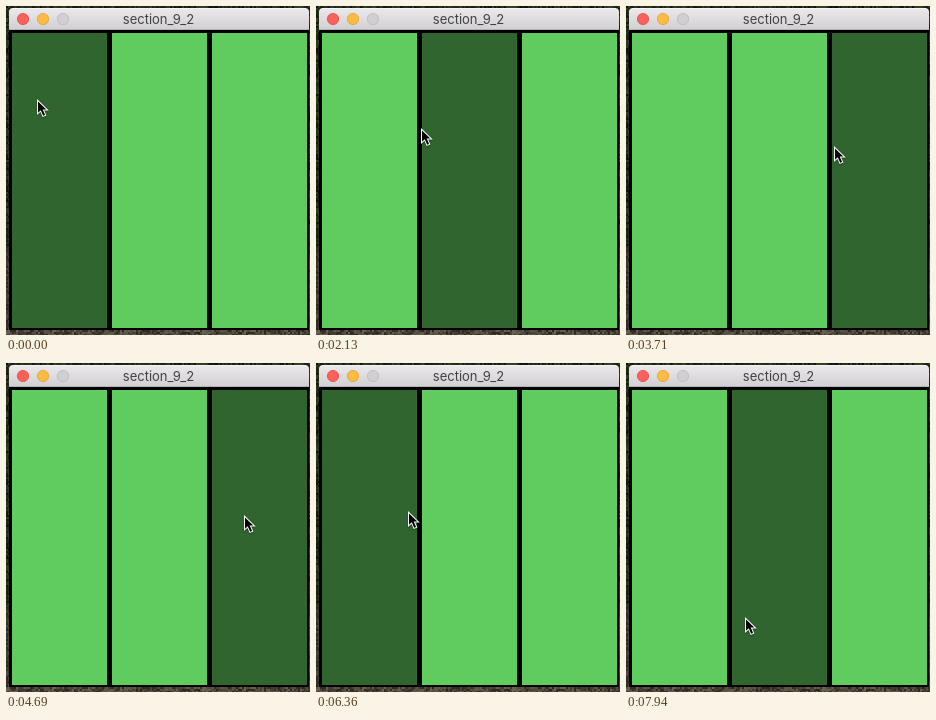
Write an HTML page with a canvas that moves like this. It is 304 px wide and 329 px high and loops after 8000 ms.

```html
<!DOCTYPE html>
<html lang="en">
<head>
<meta charset="utf-8">
<title>section_9_2</title>
<style>
  html, body { margin: 0; width: 100%; height: 100%; overflow: hidden; background: #000; }
  canvas { position: absolute; left: 0; top: 0; display: block; }
  #title {
    position: absolute; left: 3px; top: 2px; width: 299px; height: 22px;
    font: 13px/23px Inter, Roboto, sans-serif; color: #424142; text-align: center;
  }
</style>
</head>
<body>
<canvas id="stage" width="304" height="329"></canvas>
<div id="title">section_9_2</div>
<script>
const ctx = document.getElementById('stage').getContext('2d');
const LOOP = 8000;
const LIGHT = '#60cb5f', DARK = '#306530';

// Pointer path as [step, x, y]; each run advances in small discrete steps.
const runs = [
  { start: 900, period: 87.9, offset: -2, keys: [
    [0, 32, 94], [7, 65, 113], [10, 79, 116], [20, 136, 129],
    [23, 157, 130], [30, 191, 136], [38, 241, 153]] },
  { start: 4690, period: 87.99, offset: 0, keys: [
    [0, 241, 153], [1, 239, 153], [10, 172, 149], [14, 142, 148],
    [20, 93, 149], [30, 44, 205], [38, 120, 255]] }
];

let seed = 7;
function random() {
  seed = (seed * 16807) % 2147483647;
  return seed / 2147483647;
}

function slope(a, b, axis) {
  return (b[axis] - a[axis]) / (b[0] - a[0]);
}

function tangent(keys, i, axis) {
  if (i === 0) return slope(keys[0], keys[1], axis);
  if (i === keys.length - 1) return slope(keys[i - 1], keys[i], axis);
  const a = slope(keys[i - 1], keys[i], axis);
  const b = slope(keys[i], keys[i + 1], axis);
  return a * b <= 0 ? 0 : 2 * a * b / (a + b);
}

// Monotone cubic through the keys, so the pointer never overshoots a turn.
function along(keys, n, axis) {
  let i = 0;
  while (i < keys.length - 2 && n >= keys[i + 1][0]) i++;
  const a = keys[i], b = keys[i + 1], h = b[0] - a[0];
  const u = (n - a[0]) / h, v = 1 - u;
  return v * v * (1 + 2 * u) * a[axis] + u * u * (3 - 2 * u) * b[axis]
    + h * u * v * (v * tangent(keys, i, axis) - u * tangent(keys, i + 1, axis));
}

function pointerAt(t) {
  const run = runs[t < runs[1].start ? 0 : 1];
  const tick = Math.floor((t - run.start) / 10) * 10 + 10;
  const n = Math.max(0, Math.min(38, Math.ceil((tick - run.offset) / run.period)));
  return [1, 2].map(axis => Math.round(along(run.keys, n, axis)));
}

function drawDesktop() {
  ctx.fillStyle = '#14170e';
  ctx.fillRect(0, 0, 304, 329);
  for (let y = 0; y < 329; y += 2) {
    const edge = y < 2 || y > 323;
    for (let x = 0; x < 304; x += 2) {
      if (!edge && x > 2 && x < 302) continue;
      const stone = y > 240;
      const light = (stone ? 14 : 5) + random() * (y > 323 ? 24 : 15);
      ctx.fillStyle = `hsl(${stone ? 35 : 85} ${stone ? 14 : 32}% ${light}%)`;
      ctx.fillRect(x, y, 2, 2);
    }
  }
}

function drawTitleBar() {
  const shade = ctx.createLinearGradient(0, 2, 0, 23);
  shade.addColorStop(0, '#ebe9eb');
  shade.addColorStop(1, '#d2d0d2');
  ctx.fillStyle = shade;
  ctx.beginPath();
  ctx.roundRect(3, 2, 300, 22, [4, 4, 0, 0]);
  ctx.fill();
  ctx.fillStyle = '#f5f4f5';
  ctx.fillRect(6, 2, 294, 1);
  ctx.fillStyle = '#b4b2b4';
  ctx.fillRect(3, 23, 300, 1);
  [['#fc605b', '#e04943'], ['#fdbc40', '#dfa032'], ['#d2cfd2', '#bab8ba']]
    .forEach(([fill, rim], i) => {
      ctx.beginPath();
      ctx.arc(17 + i * 20, 13, 5.6, 0, Math.PI * 2);
      ctx.fillStyle = fill;
      ctx.fill();
      ctx.strokeStyle = rim;
      ctx.lineWidth = 0.8;
      ctx.stroke();
    });
}

const arrow = new Path2D(
  'M1 2.4V13.8L3.8 11.2L6.2 16.8L8.1 16L5.7 10.5H9.3Z');

function drawPointer(x, y) {
  ctx.save();
  ctx.translate(x - 1, y - 1);
  ctx.lineWidth = 2;
  ctx.strokeStyle = '#fff';
  ctx.shadowColor = 'rgba(0,0,0,.35)';
  ctx.shadowBlur = 2;
  ctx.shadowOffsetY = 1;
  ctx.stroke(arrow);
  ctx.shadowColor = 'transparent';
  ctx.fillStyle = '#000';
  ctx.fill(arrow);
  ctx.restore();
}

function draw(t) {
  const [x, y] = pointerAt(t);
  const active = Math.floor((x - 3) / 100);
  ctx.fillStyle = '#000';
  ctx.fillRect(3, 24, 300, 300);
  for (let i = 0; i < 3; i++) {
    ctx.fillStyle = i === active ? DARK : LIGHT;
    ctx.fillRect(6 + i * 100, 27, 95, 295);
  }
  drawPointer(x, y);
}

drawDesktop();
drawTitleBar();
const began = performance.now();
function frame() {
  draw((performance.now() - began) % LOOP);
  requestAnimationFrame(frame);
}
frame();
</script>
</body>
</html>
```
